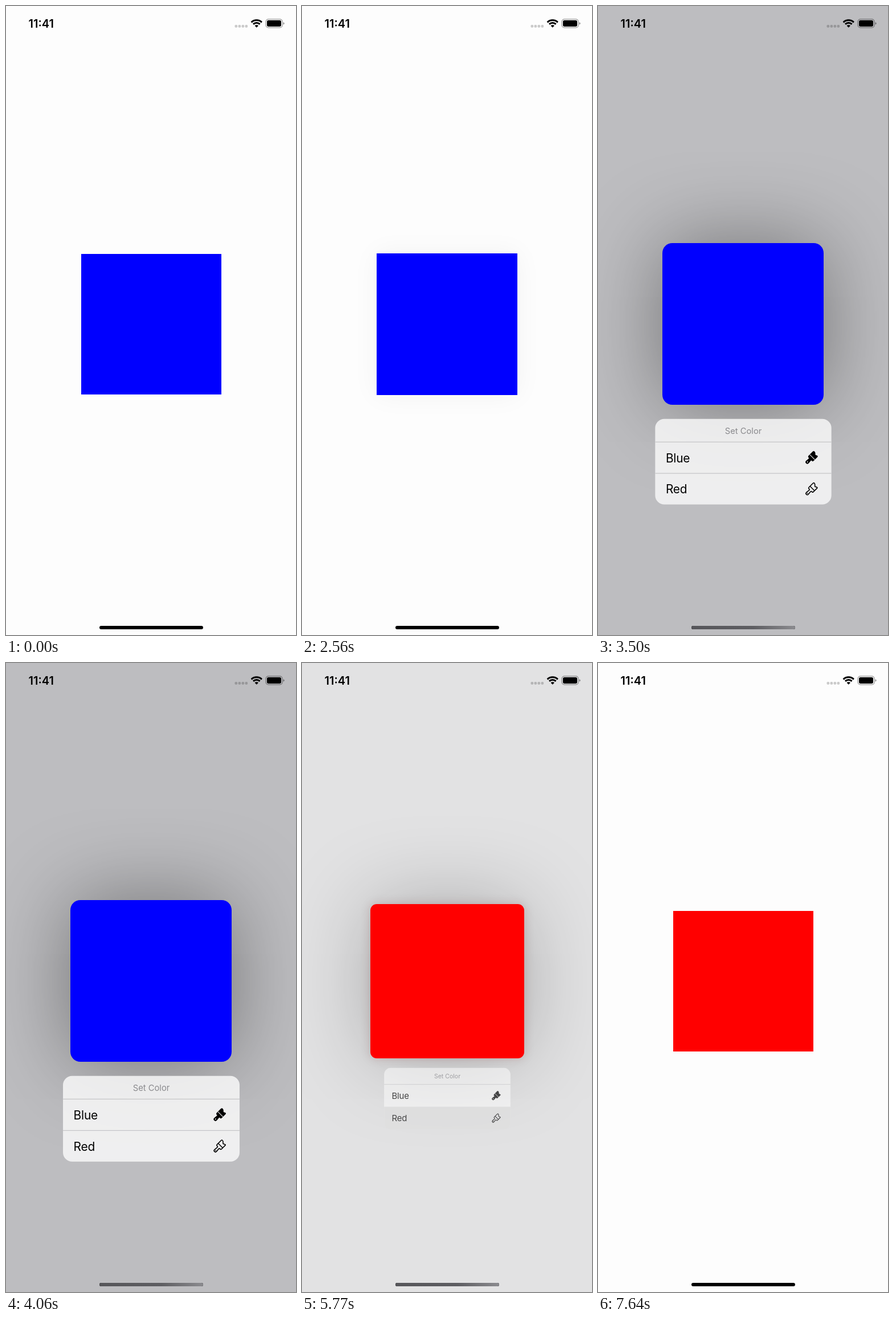
An HTML page for the animation above (8 s loop, 509x1101 px).

```html
<!DOCTYPE html>
<html lang="en">
<head>
<meta charset="utf-8">
<title>Context menu</title>
<style>
  html, body { margin: 0; width: 100%; height: 100%; overflow: hidden; }
  body { position: relative; background: #fdfdfd; font-family: Inter, sans-serif; color: #000; }
  #square { position: absolute; left: 254.5px; top: 556.6px; }
  #menu {
    position: absolute; left: 99.5px; top: 0; width: 310px; height: 150px;
    border-radius: 16px; overflow: hidden; transform-origin: 50% 0;
    background: rgba(250, 250, 250, .82);
  }
  #menu div { position: absolute; left: 0; width: 100%; box-sizing: border-box; }
  .head { top: 0; height: 41px; line-height: 42px; text-align: center; font-size: 14.75px; color: #8a8a8e; }
  .row { height: 55px; line-height: 55px; padding-left: 18.6px; font-size: 20.9px; letter-spacing: -.2px; border-top: 1px solid #bcbcbe; }
  .row svg { position: absolute; left: 260px; top: 11px; }
  #blue { top: 40px; }
  #red { top: 95px; }
  #red.on { background: rgba(0, 10, 10, .095); border-top-color: transparent; }
  #status { position: absolute; left: 0; top: 0; }
  #home, #home i { position: absolute; height: 6px; width: 182px; border-radius: 3px; }
  #home { left: 163.5px; top: 1085px; background: #000; }
  #home i { left: 0; top: 0; background: linear-gradient(90deg, #56565a, #5e5e62 60%, #8b8b8f); }
</style>
</head>
<body>
<div id="square"></div>
<div id="menu">
  <div class="head">Set Color</div>
  <div class="row" id="blue">Blue
    <svg width="32" height="32"><g transform="translate(14.4 17) rotate(45)">
      <path id="brush" stroke="#000" stroke-width="1.6" stroke-linejoin="round" d="M-5.6-10V0Q-5.6 1.8-4 1.8H-3Q-1.7 1.8-1.8 3.3L-2.4 9.5A2.4 2.4 0 0 0 2.4 9.5L1.8 3.3Q1.7 1.8 3 1.8H4Q5.6 1.8 5.6 0V-9Q5.6-10.5 4.2-10L1-8.4-2-11.2Q-5.6-13-5.6-10Z"/>
      <path d="M-6-2.8H6" stroke="#ededed" stroke-width="1.1"/>
      <circle cy="9.2" r="1" fill="#ededed"/>
    </g></svg>
  </div>
  <div class="row" id="red">Red
    <svg width="32" height="32"><g transform="translate(14.4 17) rotate(45)">
      <use href="#brush" fill="none"/>
      <path d="M-6-2.8H6" stroke="#000" stroke-width="1.5"/>
      <circle cy="9.2" r=".9"/>
    </g></svg>
  </div>
</div>
<svg id="status" width="509" height="60">
  <text x="39.5" y="38" font-size="20" font-weight="600">11:41</text>
  <g fill-opacity=".2">
    <rect x="401.5" y="33" width="4.7" height="4.7" rx="1.7"/>
    <rect x="407.5" y="33" width="4.7" height="4.7" rx="1.7"/>
    <rect x="413.5" y="33" width="4.7" height="4.7" rx="1.7"/>
    <rect x="419.5" y="33" width="4.7" height="4.7" rx="1.7"/>
  </g>
  <g transform="translate(439.8 37.7)" fill="none" stroke="#000" stroke-width="3">
    <path d="M-9.1-9.1A12.9 12.9 0 0 1 9.1-9.1M-5.8-5.8A8.2 8.2 0 0 1 5.8-5.8"/>
    <path d="M0 0L-3.2-3.2A4.5 4.5 0 0 1 3.2-3.2Z" fill="#000" stroke="none"/>
  </g>
  <rect x="456.1" y="23.1" width="29" height="14.8" rx="4.4" fill="none" stroke="#000" stroke-opacity=".42" stroke-width="1.2"/>
  <rect x="458" y="25.1" width="25" height="10.8" rx="2.6"/>
  <path d="M486.6 28.3Q488.6 29 488.6 30.5T486.6 32.7Z" fill-opacity=".45"/>
</svg>
<div id="home"><i></i></div>
<script>
const LOOP = 8000, PRESS = [2440, 3080], OPEN = 3172, CLOSE = 5556, PICK = 5610;
const $ = s => document.querySelector(s);
const square = $('#square'), menu = $('#menu'), red = $('#red'), bar = $('#home i');

const clamp = x => Math.min(1, Math.max(0, x));
const mix = (a, b, k) => a + (b - a) * k;
const ramp = (t, a, b) => clamp((t - a) / (b - a));
const smooth = x => x * x * (3 - 2 * x);

// Step response of a damped spring; t in ms, w in rad/s.
function spring(t, w, z) {
  if (t <= 0) return 0;
  const d = Math.sqrt(1 - z * z), x = w * t / 1000;
  return 1 - Math.exp(-z * x) * (Math.cos(d * x) + z / d * Math.sin(d * x));
}

function snap(t) {
  if (t < 1400) return 0;
  if (t >= 5080 && t < 5580) return 5080;
  const base = t < 5580 ? 1400 : 5590;
  if (t < base) return 5580;
  const u = (t - base) % 140;
  return Math.max(t - u + Math.min(40, Math.floor(u / 20) * 20), base === 5590 ? 5580 : 0);
}

function pose(t) {
  const press = ramp(t, ...PRESS), open = spring(t - OPEN, 12.5, .8);
  if (t < CLOSE) return {
    size: mix(mix(246, 256, press), 283.3, open),
    radius: 17.5 * open, blur: press && 20 + 130 * press,
    shade: .27 * press + .13 * open, glow: 0, dim: clamp(open),
    scale: mix(.1, 1, open), top: 722.8 - 26.5 * (1 - open), alpha: clamp(open)
  };
  const left = 1 - spring(t - CLOSE, 5.5, .85);
  return {
    size: mix(246, 283.3, left),
    radius: Math.max(0, 17.5 * left), blur: 150,
    shade: Math.max(0, .4 * left), glow: Math.max(0, .6 * (left * 2 - 1)),
    dim: 1 - smooth(ramp(t, 5560, 5940)),
    scale: mix(.2, 1, left), top: 722.8 - 39.4 * (1 - left),
    alpha: 1 - smooth(ramp(t, 5560, 6120))
  };
}

function draw(now) {
  const t = snap(now), p = pose(t), picked = t >= PICK;
  const grey = mix(253, 189, p.dim);
  document.body.style.background = `rgb(${grey},${grey},${mix(253, 192, p.dim)})`;
  Object.assign(square.style, {
    width: p.size + 'px', height: p.size + 'px', margin: `${-p.size / 2}px`,
    borderRadius: p.radius + 'px',
    background: picked ? '#f00' : '#00f',
    boxShadow: `0 0 18px rgba(${picked ? '90,0,0' : '0,0,100'},${p.glow}), 0 0 ${p.blur}px rgba(0,0,0,${p.shade})`
  });
  menu.style.transform = `translateY(${p.top}px) scale(${p.scale})`;
  menu.style.opacity = p.alpha;
  red.classList.toggle('on', t >= 5580);
  bar.style.opacity = clamp(p.dim * 3);
}

const start = performance.now();
function tick() {
  draw((performance.now() - start) % LOOP);
  requestAnimationFrame(tick);
}
tick();
</script>
</body>
</html>
```
